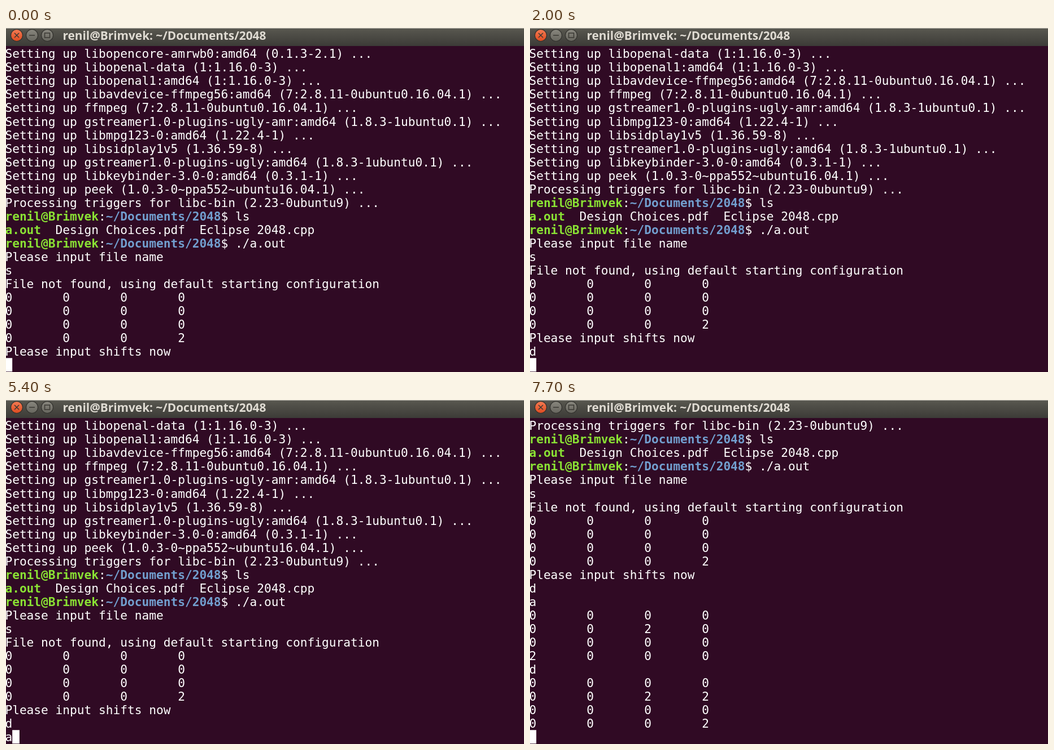
An HTML page with a canvas that plays this animation: 917 px wide and 611 px high, repeating every 8000 ms.

```html
<!DOCTYPE html>
<html lang="en">
<head>
<meta charset="utf-8">
<title>Terminal</title>
<style>
  html, body { margin: 0; width: 100%; height: 100%; overflow: hidden; background: #300a24; }
  canvas { display: block; }
</style>
</head>
<body>
<canvas id="stage" width="917" height="611"></canvas>
<script>
const ctx = document.getElementById('stage').getContext('2d');
const W = 917, H = 611, LOOP = 8000;
const CELL = 12.74, LEFT = -1.6, PITCH = 24.04, TOP = 33.3, LAST_ROW = 23;
const MONO = '21.16px "DejaVu Sans Mono", monospace';
const WHITE = '#ffffff', GREEN = '#8ae234', BLUE = '#729fcf';
const USER = 'renil@Brimvek', PATH = '~/Documents/2048';

// A line is a list of spans: [text, colour, bold]
const plain = text => [[text, WHITE, false]];
const setup = text => plain(`Setting up ${text} ...`);
const prompt = command => [
  [USER, GREEN, true], [':', WHITE, false], [PATH, BLUE, true], ['$ ' + command, WHITE, false]
];
const grid = (...rows) => rows.map(row => plain([...row].join(' '.repeat(7))));

const lines = [
  ...[
    'libopencore-amrwb0:amd64 (0.1.3-2.1)',
    'libopenal-data (1:1.16.0-3)',
    'libopenal1:amd64 (1:1.16.0-3)',
    'libavdevice-ffmpeg56:amd64 (7:2.8.11-0ubuntu0.16.04.1)',
    'ffmpeg (7:2.8.11-0ubuntu0.16.04.1)',
    'gstreamer1.0-plugins-ugly-amr:amd64 (1.8.3-1ubuntu0.1)',
    'libmpg123-0:amd64 (1.22.4-1)',
    'libsidplay1v5 (1.36.59-8)',
    'gstreamer1.0-plugins-ugly:amd64 (1.8.3-1ubuntu0.1)',
    'libkeybinder-3.0-0:amd64 (0.3.1-1)',
    'peek (1.0.3-0~ppa552~ubuntu16.04.1)'
  ].map(setup),
  plain('Processing triggers for libc-bin (2.23-0ubuntu9) ...'),
  prompt('ls'),
  [['a.out', GREEN, true], ['  Design Choices.pdf  Eclipse 2048.cpp', WHITE, false]],
  prompt('./a.out'),
  plain('Please input file name'),
  plain('s'),
  plain('File not found, using default starting configuration'),
  ...grid('0000', '0000', '0000', '0002'),
  plain('Please input shifts now'),
  plain('d'),
  plain('a'),
  ...grid('0000', '0020', '0000', '2000'),
  plain('d'),
  ...grid('0000', '0022', '0000', '0002')
];

// [time, first visible line, typed characters, cursor shown]
const states = [
  [0, 0, 0, true], [200, 0, 0, false], [800, 0, 0, true],
  [1000, 0, 1, true], [1600, 0, 1, false], [1900, 0, 1, true],
  [2000, 1, 0, true], [2500, 1, 0, false], [3100, 1, 0, true],
  [3700, 1, 0, false], [4300, 1, 0, true], [4900, 1, 0, false],
  [5400, 1, 1, true],
  [5800, 6, 0, true], [6400, 6, 0, false], [7000, 6, 0, true],
  [7500, 6, 1, true],
  [7700, 11, 0, true]
];

const colX = col => LEFT + col * CELL;
const rowY = row => TOP + row * PITCH;

function drawLine(spans, row) {
  const baseline = Math.round(rowY(row) + 20);
  let col = 0;
  for (const [text, colour, bold] of spans) {
    ctx.fillStyle = colour;
    ctx.font = (bold ? 'bold ' : '') + MONO;
    for (const ch of text) {
      if (ch !== ' ') ctx.fillText(ch, colX(col), baseline);
      col++;
    }
  }
}

function gradient(y0, y1, from, to) {
  const g = ctx.createLinearGradient(0, y0, 0, y1);
  g.addColorStop(0, from);
  g.addColorStop(1, to);
  return g;
}

function drawButton(x, from, to, drawIcon) {
  const y = 13;
  ctx.beginPath();
  ctx.arc(x, y, 10.5, 0, Math.PI * 2);
  ctx.fillStyle = gradient(y - 11, y + 11, from, to);
  ctx.fill();
  ctx.strokeStyle = '#33322e';
  ctx.lineWidth = 1.2;
  ctx.stroke();
  ctx.strokeStyle = '#3a3833';
  ctx.lineWidth = 1.5;
  ctx.beginPath();
  drawIcon(x, y);
  ctx.stroke();
}

function drawTitleBar() {
  ctx.fillStyle = gradient(0, 32, '#595850', '#3c3b37');
  ctx.fillRect(0, 0, W, 32);
  ctx.fillStyle = '#b5b3ab';
  ctx.fillRect(0, 0, W, 1);
  drawButton(19, '#f47c54', '#dd4a1f', (x, y) => {
    ctx.moveTo(x - 4, y - 4); ctx.lineTo(x + 4, y + 4);
    ctx.moveTo(x + 4, y - 4); ctx.lineTo(x - 4, y + 4);
  });
  drawButton(46, '#89877e', '#66655d', (x, y) => {
    ctx.moveTo(x - 5, y); ctx.lineTo(x + 5, y);
  });
  drawButton(73, '#89877e', '#66655d', (x, y) => ctx.rect(x - 4.5, y - 4, 9, 8));
  ctx.font = 'bold 20.8px "Open Sans", sans-serif';
  ctx.fillStyle = '#dfdbd2';
  ctx.fillText(`${USER}: ${PATH}`, 100.5, 20.5);
}

function draw(time) {
  const [, first, typed, cursor] = states.findLast(s => s[0] <= time);
  ctx.fillStyle = '#300a24';
  ctx.fillRect(0, 0, W, H);
  for (let row = 0; row < LAST_ROW + typed; row++) drawLine(lines[first + row], row);
  if (cursor) {
    ctx.fillStyle = WHITE;
    ctx.fillRect(colX(typed), rowY(LAST_ROW), CELL, PITCH);
  }
  drawTitleBar();
}

const start = performance.now();
function tick() {
  draw((performance.now() - start) % LOOP);
  requestAnimationFrame(tick);
}
tick();
</script>
</body>
</html>
```
